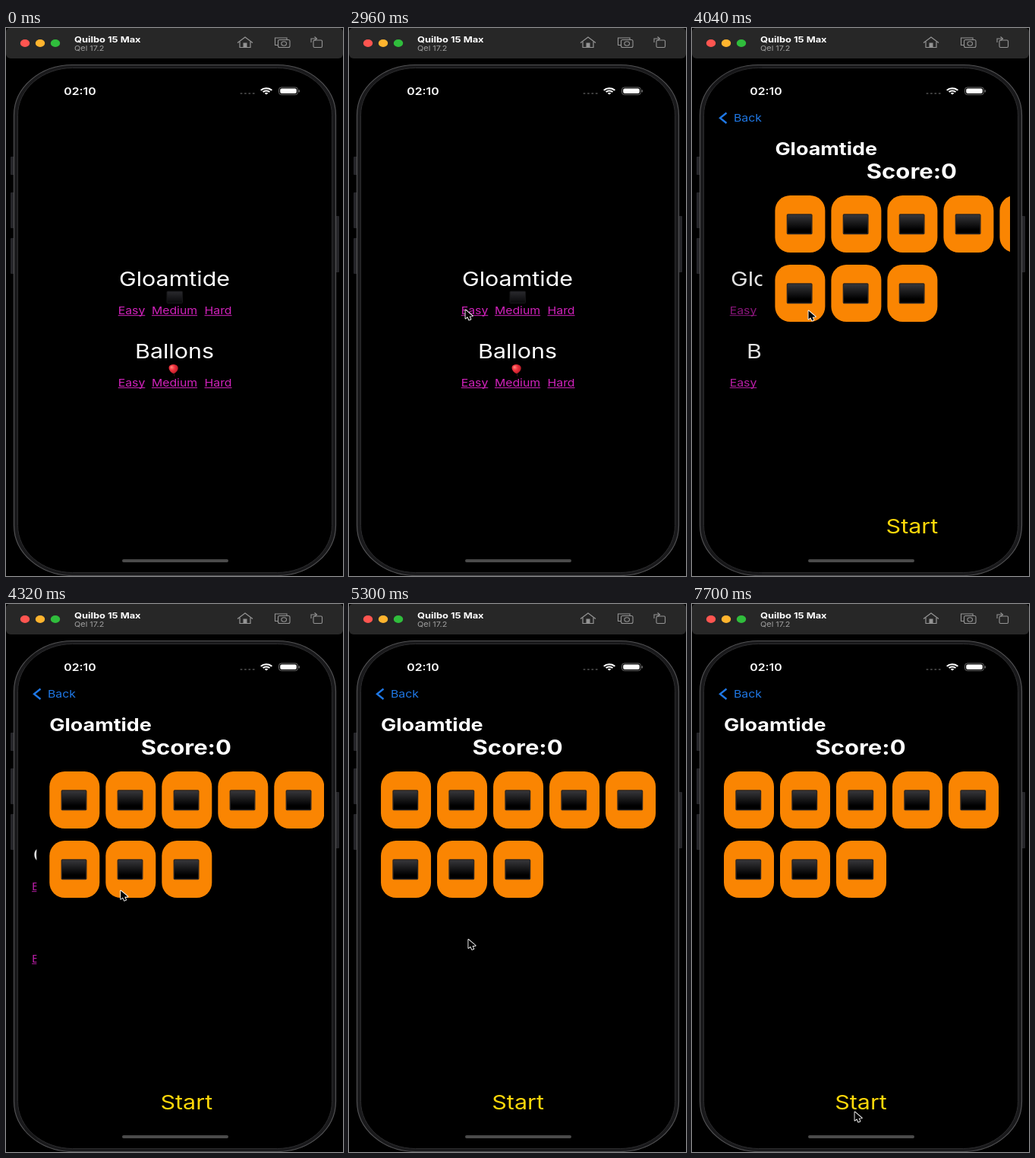
Recreate the animation shown at these times as an HTML page with a canvas. Size 444 px wide and 720 px high, loop 8000 ms.

```html
<!DOCTYPE html>
<html lang="en">
<head>
<meta charset="utf-8">
<title>Card game menu</title>
<style>
  html, body { margin: 0; width: 100%; height: 100%; overflow: hidden; background: #000; }
  canvas { display: block; width: 444px; height: 720px; }
</style>
</head>
<body>
<canvas id="stage" width="444" height="720"></canvas>
<script>
const ctx = document.getElementById('stage').getContext('2d');
const LOOP = 8000;
const WIDE = 1.17; // the whole screen is shown in a widened aspect
const FONT = 'Inter, "Open Sans", sans-serif';
const WHITE = '#fff', PINK = '#d322bd', BLUE = '#1f78e6', BAR = '#272727', ICON = '#949494';
const SCREEN = { left: 25, right: 419, width: 394 };
const PUSH = { start: 3556, rate: 0.0066 };

// time, x, y of the pointer tip
const POINTER = [
  [900, -14, 378], [1560, 113, 367], [1800, 132, 369], [2120, 153, 370],
  [3760, 153, 370], [4040, 153, 371], [4640, 148, 382],
  [6280, 170, 527], [7700, 214, 667]
];

const clamp = (v, lo = 0, hi = 1) => Math.min(hi, Math.max(lo, v));
const mix = (a, b, k) => a + (b - a) * k;

function text(str, x, y, size, color, { weight = 400, align = 'left' } = {}) {
  ctx.save();
  ctx.translate(x, y);
  ctx.scale(WIDE, 1);
  ctx.font = `${weight} ${size}px ${FONT}`;
  ctx.textAlign = align;
  ctx.fillStyle = color;
  ctx.fillText(str, 0, 0);
  const width = ctx.measureText(str).width * WIDE;
  ctx.restore();
  return width;
}

function box(x, y, w, h, r, fill, stroke, line = 1) {
  ctx.beginPath();
  ctx.roundRect(x, y, w, h, r);
  if (fill) { ctx.fillStyle = fill; ctx.fill(); }
  if (stroke) { ctx.strokeStyle = stroke; ctx.lineWidth = line; ctx.stroke(); }
}

function oval(x, y, rx, ry, fill) {
  ctx.beginPath();
  ctx.ellipse(x, y, rx, ry, 0, 0, Math.PI * 2);
  ctx.fillStyle = fill;
  ctx.fill();
}

function path(points, color, line, close) {
  ctx.beginPath();
  points.forEach(([x, y]) => ctx.lineTo(x, y));
  if (close) ctx.closePath();
  ctx.strokeStyle = color;
  ctx.lineWidth = line;
  ctx.stroke();
}

function shade(y, h, top, bottom) {
  const g = ctx.createLinearGradient(0, y, 0, y + h);
  g.addColorStop(0, top);
  g.addColorStop(1, bottom);
  return g;
}

function clipped(left, right, draw) {
  if (right <= left) return;
  ctx.save();
  ctx.beginPath();
  ctx.rect(left, 50, right - left, 668);
  ctx.clip();
  draw();
  ctx.restore();
}

function toolbar() {
  box(0, 0, 444, 40, [5, 5, 6, 6], BAR);
  ['#ff5550', '#ffb42e', '#30bd3c'].forEach((c, i) => oval(25 + i * 20, 20, 6.2, 5, c));
  text('Quilbo 15 Max', 90, 18.5, 11, WHITE, { weight: 700 });
  text('Qel 17.2', 90, 29.5, 9.3, '#a2a2a2');

  path([[305, 19.5], [315, 12], [325, 19.5]], ICON, 1.2);
  path([[308, 18], [308, 25.5], [322, 25.5], [322, 18]], ICON, 1.2);
  ctx.fillStyle = ICON;
  ctx.fillRect(312.5, 19.5, 5, 6);

  path([[358, 22.5], [354.5, 22.5], [354.5, 13], [370, 13], [370, 15]], ICON, 1.1);
  box(358.5, 15.5, 15.5, 10, 2, BAR, ICON, 1.1);
  ctx.beginPath();
  ctx.ellipse(366.2, 20.5, 3.3, 2.7, 0, 0, Math.PI * 2);
  ctx.stroke();

  box(405, 16, 11.5, 9.5, 1.5, null, ICON, 1.1);
  path([[402, 19], [402, 14], [409, 14]], ICON, 1.1);
  path([[406.5, 11.5], [409.5, 14], [406.5, 16.5]], ICON, 1.1);
}

function phone() {
  const side = '#26262a';
  [[169, 24], [216, 47], [276, 47]].forEach(([y, h]) => box(6, y, 5, h, 1, side));
  box(434, 247, 5, 74, 1, side);
  box(10.5, 48.5, 424, 671, { x: 77, y: 66 }, '#19191b', '#515153', 1.2);
  box(15.5, 52.5, 414, 663, { x: 72, y: 62 }, '#000', '#2c2c2e', 1);
}

function statusBar() {
  text('02:10', 97.5, 88, 13.5, WHITE, { weight: 600, align: 'center' });
  for (let i = 0; i < 4; i++) oval(310 + i * 5.4, 86, 1.6, 1, '#444');

  ctx.save();
  ctx.translate(343, 87.5);
  ctx.scale(1.2, 1);
  ctx.strokeStyle = WHITE;
  ctx.lineWidth = 2;
  const fan = r => ctx.arc(0, 0, r, -Math.PI * 0.76, -Math.PI * 0.24);
  [5, 8.2].forEach(r => {
    ctx.beginPath();
    fan(r);
    ctx.stroke();
  });
  ctx.beginPath();
  ctx.moveTo(0, 0);
  fan(2.7);
  ctx.fillStyle = WHITE;
  ctx.fill();
  ctx.restore();

  box(359.5, 78, 25, 9.6, 3.2, null, '#6c6c6c', 1);
  box(361.2, 79.6, 21.6, 6.4, 2, WHITE);
  box(385.6, 81.2, 1.5, 3.2, 1, '#6c6c6c');
}

function links(baseline, pressed) {
  [['Easy', 165.5], ['Medium', 222], ['Hard', 279.5]].forEach(([label, x], i) => {
    ctx.save();
    if (i === 0) ctx.globalAlpha = pressed;
    const w = text(label, x, baseline, 13.5, PINK, { align: 'center' });
    ctx.fillStyle = PINK;
    ctx.fillRect(x - w / 2, baseline + 1.2, w, 1);
    ctx.restore();
  });
}

function balloon(x, y) {
  path([[x + 1, y + 6], [x + 2, y + 10]], '#3a1216', 1);
  const g = ctx.createRadialGradient(x - 2, y - 2, 0.5, x, y, 7.5);
  g.addColorStop(0, '#ff8078');
  g.addColorStop(0.4, '#f23540');
  g.addColorStop(1, '#b01624');
  ctx.beginPath();
  ctx.moveTo(x + 1, y + 6.5);
  ctx.bezierCurveTo(x - 5, y + 5, x - 9.5, y - 5, x, y - 5.6);
  ctx.bezierCurveTo(x + 9.5, y - 5.6, x + 8, y + 3.5, x + 1, y + 6.5);
  ctx.fillStyle = g;
  ctx.fill();
}

function menu(pressed) {
  text('Gloamtide', 222, 339, 26, WHITE, { align: 'center' });
  box(212, 346, 20.5, 15.5, 1, shade(346, 15.5, '#2a2a2e', '#08080a'), '#161618');
  links(376, pressed);
  text('Ballons', 222, 434, 26, WHITE, { align: 'center' });
  balloon(220, 447.5);
  links(471, 1);
}

function card(x, y) {
  box(x, y, 66, 75, { x: 20, y: 20 }, '#fa8502');
  box(x + 16, y + 25, 32.5, 25.5, 1, shade(y + 25, 20, '#38383c', '#000'), '#2c2622', 1.4);
}

function game() {
  text('Gloamtide', 42, 167, 23, WHITE, { weight: 700 });
  text('Score:0', 222, 198, 26.5, WHITE, { weight: 700, align: 'center' });
  for (let i = 0; i < 8; i++) card(42 + (i % 5) * 74, 220 + Math.floor(i / 5) * 91);
  text('Start', 222.5, 664, 26, '#ffd80a', { align: 'center' });
}

function backButton(alpha) {
  ctx.save();
  ctx.globalAlpha = alpha;
  path([[45.5, 111.5], [37, 118.3], [45.5, 125]], BLUE, 2.4);
  text('Back', 55, 123, 13.5, BLUE);
  ctx.restore();
}

function pointer(t) {
  if (t < POINTER[0][0]) return;
  const next = POINTER.findIndex(k => k[0] > t);
  const b = next < 0 ? POINTER[POINTER.length - 1] : POINTER[next];
  const a = next < 0 ? b : POINTER[next - 1];
  const k = a === b ? 0 : (t - a[0]) / (b[0] - a[0]);
  ctx.save();
  ctx.translate(mix(a[1], b[1], k), mix(a[2], b[2], k));
  ctx.lineJoin = 'round';
  path([[0.5, 0.5], [0.5, 11.5], [3.2, 9.3], [5.2, 13.5], [7.4, 12.6],
        [5.6, 8.7], [9.8, 8.4]], WHITE, 1.8, true);
  ctx.fillStyle = '#000';
  ctx.fill();
  ctx.restore();
}

// critically damped spring, from 1 to 0
function slideLeft(t) {
  if (t < PUSH.start) return 1;
  const x = (t - PUSH.start) * PUSH.rate;
  return (1 + x) * Math.exp(-x);
}

function linkAlpha(t) {
  if (t < 3440) return 1;
  if (t < 3520) return mix(1, 0.25, (t - 3440) / 80);
  return mix(0.25, 1, clamp((t - 3520) / 800));
}

function draw(t) {
  ctx.fillStyle = '#000';
  ctx.fillRect(0, 0, 444, 720);
  toolbar();
  phone();

  const left = slideLeft(t), done = 1 - left;
  const offset = left * SCREEN.width;
  const edge = SCREEN.left + offset;

  clipped(SCREEN.left, edge, () => {
    ctx.save();
    ctx.translate(-0.3 * SCREEN.width * done, 0);
    menu(linkAlpha(t));
    ctx.restore();
    ctx.fillStyle = `rgba(0,0,0,${0.14 * done})`;
    ctx.fillRect(SCREEN.left, 50, SCREEN.width, 668);
  });
  clipped(edge, SCREEN.right, () => {
    ctx.translate(offset, 0);
    game();
  });

  backButton(clamp(done * 2.6));
  statusBar();
  box(153, 698, 140, 4, 2, '#4a4a4a');
  pointer(t);
}

function frame(now) {
  draw(now % LOOP);
  requestAnimationFrame(frame);
}
requestAnimationFrame(frame);
</script>
</body>
</html>
```
